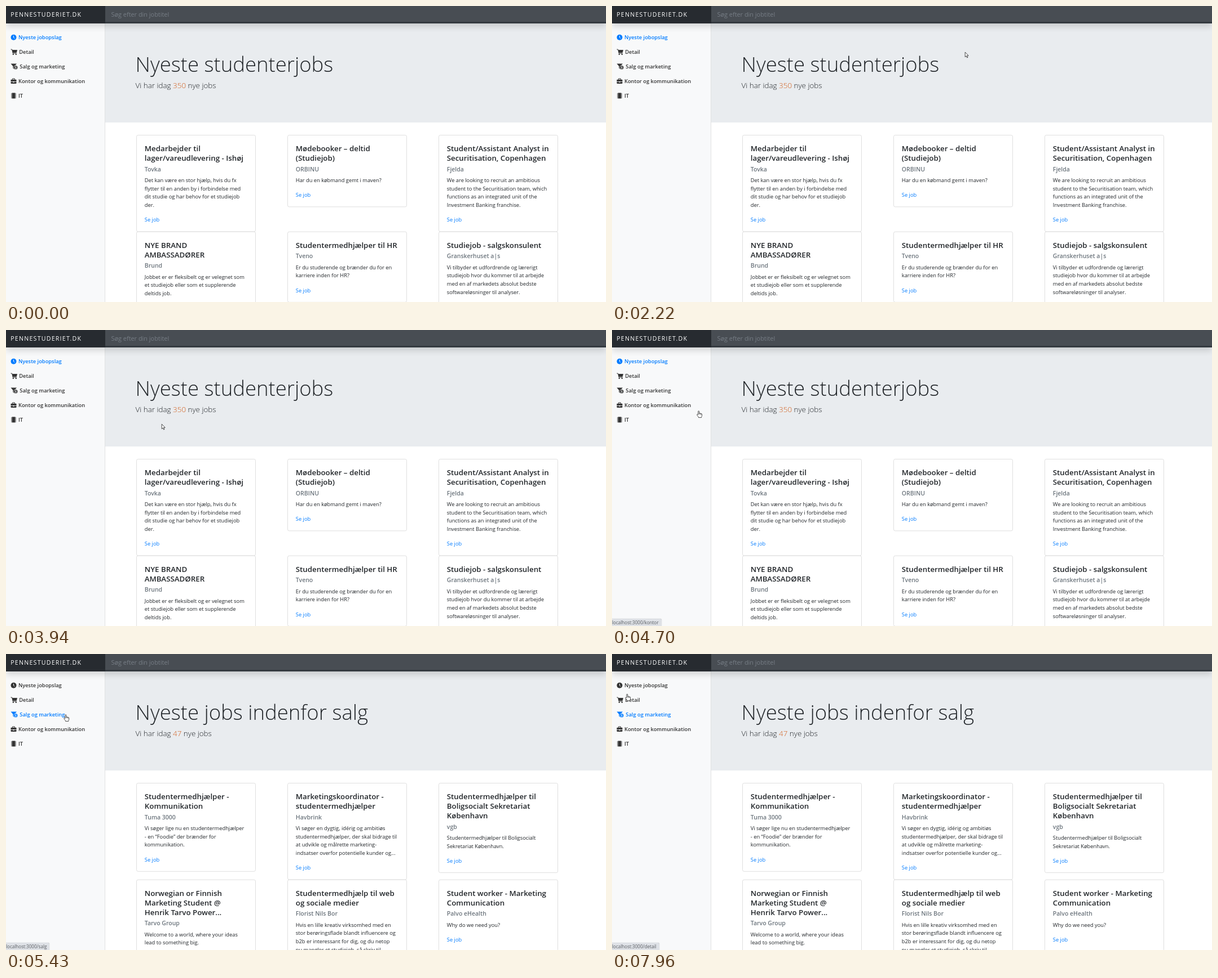
Write an HTML page that moves like this. It is 1064 by 526 pixels and loops after 8 s.

```html
<!DOCTYPE html>
<html lang="da">
<head>
<meta charset="utf-8">
<title>Nyeste studenterjobs</title>
<style>
  html, body { margin: 0; width: 100%; height: 100%; overflow: hidden; background: #fff; }
  body, text { font-family: "Open Sans", "Noto Sans", sans-serif; }
  div, svg { position: absolute; }
  svg { left: 0; top: 0; }
  #side { left: 0; top: 0; width: 175px; height: 526px; background: #f8f9fa; border-right: 1px solid #e0e1e2; }
  #hero { left: 176px; top: 31px; width: 888px; height: 175.5px; background: #e9ecef; }
  #bar { left: 0; top: 0; width: 1064px; height: 30.5px; background: #343a40; box-shadow: 0 5.6px 11.2px rgba(0,0,0,.15); }
  #name { left: 0; top: 0; width: 176px; height: 30.5px; background: #272b30; }
  #search { left: 176px; top: 0; width: 888px; height: 28px; background: #484d53; }
  #status { left: 0; bottom: 0; height: 13px; padding-right: 5px; background: #dee1e6; border-radius: 0 3px 0 0;
    box-shadow: 0 0 1px #999; color: #5a5e63; font-size: 8.1px; line-height: 14px; white-space: nowrap; }
  text { white-space: pre; fill: #212529; }
  .brand { font-size: 10.6px; letter-spacing: 1.25px; fill: #fff; }
  .hint { font-size: 10.9px; fill: #777e86; }
  .head { font-size: 36.5px; font-weight: 300; }
  .lead { font-size: 13.4px; font-weight: 300; }
  .lead tspan { fill: #d2601f; }
  .title { font-size: 13.3px; font-weight: 600; }
  .firm { font-size: 10.5px; font-weight: 600; fill: #6c757d; }
  .body, .link { font-size: 9.3px; }
  .link { fill: #007bff; }
  .card { fill: #fff; stroke: #dfdfdf; }
  .nav { color: #333; }
  .nav.on { color: #007bff; }
  .nav text { font-size: 9.3px; font-weight: 600; fill: currentColor; }
  .nav path { fill: currentColor; }
  .nav .line { fill: none; stroke: currentColor; }
  .nav .cut { fill: none; stroke: #f8f9fa; }
  .pointer { fill: #fff; stroke: #222; stroke-width: .8; stroke-linejoin: round; }
  .beam { fill: none; stroke: #444; stroke-width: .9; }
</style>
</head>
<body>
<div id="side"></div>
<div id="hero"></div>
<div id="bar"><div id="name"></div><div id="search"></div></div>
<svg id="stage" width="1064" height="526"></svg>
<div id="status"></div>
<svg width="1064" height="526"><g id="cursor"></g></svg>
<script>
const $ = id => document.getElementById(id);
const text = (cls, x, y, s) => `<text class="${cls}" x="${x}" y="${y}">${s}</text>`;

const pages = [
  { head: 'Nyeste studenterjobs', count: 350, cards: [
    ['Medarbejder til|lager/vareudlevering - Ishøj', 'Tovka',
      'Det kan være en stor hjælp, hvis du fx|flytter til en anden by i forbindelse med|dit studie og har behov for et studiejob|der.'],
    ['Mødebooker – deltid|(Studiejob)', 'ORBINU', 'Har du en købmand gemt i maven?'],
    ['Student/Assistant Analyst in|Securitisation, Copenhagen', 'Fjelda',
      'We are looking to recruit an ambitious|student to the Securitisation team, which|functions as an integrated unit of the|Investment Banking franchise.'],
    ['NYE BRAND|AMBASSADØRER', 'Brund',
      'Jobbet er er fleksibelt og er velegnet som|et studiejob eller som et supplerende|deltids job.'],
    ['Studentermedhjælper til HR', 'Tveno', 'Er du studerende og brænder du for en|karriere inden for HR?'],
    ['Studiejob - salgskonsulent', 'Granskerhuset a|s',
      'Vi tilbyder et udfordrende og lærerigt|studiejob hvor du kommer til at arbejde|med en af markedets absolut bedste|softwareløsninger til analyser.']
  ] },
  { head: 'Nyeste jobs indenfor salg', count: 47, cards: [
    ['Studentermedhjælper -|Kommunikation', 'Tuma 3000',
      'Vi søger lige nu en studentermedhjælper|- en “Foodie” der brænder for|kommunikation.'],
    ['Marketingskoordinator -|studentermedhjælper', 'Havbrink',
      'Vi søger en dygtig, idérig og ambitiøs|studentermedhjælper, der skal bidrage til|at udvikle og målrette marketing-|indsatser overfor potentielle kunder og...'],
    ['Studentermedhjælper til|Boligsocialt Sekretariat|København', 'vgb',
      'Studentermedhjælper til Boligsocialt|Sekretariat København.'],
    ['Norwegian or Finnish|Marketing Student @|Henrik Tarvo Power...', 'Tarvo Group',
      'Welcome to a world, where your ideas|lead to something big.'],
    ['Studentermedhjælp til web|og sociale medier', 'Florist Nils Bor',
      'Hvis en lille kreativ virksomhed med en|stor berøringsflade blandt influencere og|b2b er interessant for dig, og du netop|nu mangler et studiejob, så skriv til'],
    ['Student worker - Marketing|Communication', 'Palvo eHealth', 'Why do we need you?']
  ] }
];

function card([title, firm, body], i) {
  const x = 231.5 + i % 3 * 268, top = i < 3 ? 229.5 : 401.2, tx = x + 14.3;
  const titles = title.split('|'), lines = body.split('|');
  const firmY = top + 47.2 + 17 * (titles.length - 1);
  const linkY = firmY + 45.4 + 14.7 * (lines.length - 1);
  return `<rect class="card" x="${x}" y="${top}" width="211" height="${linkY + 17.8 - top}" rx="2.8"/>` +
    titles.map((s, n) => text('title', tx, top + 28.6 + 17 * n, s)).join('') +
    text('firm', tx, firmY, firm) +
    lines.map((s, n) => text('body', tx, firmY + 19.3 + 14.7 * n, s)).join('') +
    text('link', tx, linkY, 'Se job');
}

const page = (p, i) => `<g id="page${i}">` + text('head', 229.6, 116.8, p.head) +
  text('lead', 229.6, 145.8, `Vi har idag <tspan>${p.count}</tspan> nye jobs`) + p.cards.map(card).join('') + '</g>';

// Icons are drawn around the vertical centre of their row.
const links = [
  ['Nyeste jobopslag', 22, '',
    '<path d="M8.5 0a5 5 0 1 0 10 0a5 5 0 1 0-10 0"/><path class="cut" d="M13.5-3V.3L15.4 1.8"/>'],
  ['Detail', 23.3, 'detail',
    '<path d="M10.8-3.6H20L18.8 1.2H12Z"/><path class="line" d="M8.5-4.6H10.6L12.3 2.4H18.6"/>' +
    '<path d="M11.6 4a1.2 1.2 0 1 0 2.4 0a1.2 1.2 0 1 0-2.4 0M16.6 4a1.2 1.2 0 1 0 2.4 0a1.2 1.2 0 1 0-2.4 0"/>'],
  ['Salg og marketing', 24.3, 'salg',
    '<path d="M8.5-5H19L15-.5V4.8L12.4 3V-.5Z"/><path stroke="#f8f9fa" stroke-width=".6" d="M13.8 1.6a3.5 3.5 0 1 0 7 0a3.5 3.5 0 1 0-7 0"/>' +
    '<path class="cut" stroke-width=".8" d="M18.4.2H16.7V1.6H18V3H16.2"/>'],
  ['Kontor og kommunikation', 22, 'kontor',
    '<path d="M9.3-2.8H17.7Q18.5-2.8 18.5-2V.6H8.5V-2Q8.5-2.8 9.3-2.8ZM8.5 1.3H12.3V2.3H14.7V1.3H18.5V3.6Q18.5 4.4 17.7 4.4H9.3Q8.5 4.4 8.5 3.6Z"/>' +
    '<path class="line" d="M11.5-2.8V-4.4H15.5V-2.8"/>'],
  ['IT', 22, 'it',
    '<path d="M10.5-5H16.5V5H10.5Z"/><path class="line" stroke-dasharray="1 .9" d="M9.5-4V4.3M17.5-4V4.3"/>']
];

$('stage').innerHTML = text('brand', 8.2, 18.8, 'PENNESTUDERIET.DK') +
  text('hint', 186.5, 19.2, 'Søg efter din jobtitel') +
  links.map(([label, x, , icon], i) =>
    `<g class="nav" transform="translate(0 ${55.8 + 25.9 * i})">${icon}${text('', x, 3.4, label)}</g>`).join('') +
  pages.map(page).join('');
const navs = document.querySelectorAll('.nav');

const shapes = {
  arrow: '<path class="pointer" d="M.4.4V9L2.4 7.2L3.8 10.3L5.2 9.7L3.8 6.6H6.4Z"/>',
  beam: '<path class="beam" d="M-2-4.5H-.6L0-4L.6-4.5H2M0-4V4M-2 4.5H-.6L0 4L.6 4.5H2"/>',
  hand: '<path class="pointer" d="M-1.1 7V1Q-1.1.3-.2.3T.8 1V4.3Q1.7 3.7 2.5 4.6Q3.5 4.2 4.1 5.1Q5.6 4.8 5.6 6.3V8.6Q5.6 10 4.8 10.8V12H-.5V11L-3 7.7Q-3.6 6.6-2.7 6.1Q-2 5.9-1.1 7Z"/>' +
    '<path class="beam" stroke-width=".6" d="M.8 4.3V6.4M2.5 4.8V6.6M4.1 5.2V6.8"/>'
};

// start, end, steps, target x, target y, shape on arrival
const moves = [
  [450, 520, 2, 1052, 518, 'arrow'],
  [750, 1070, 5, 811, 266, 'beam'],
  [1440, 1670, 4, 635, 78, 'arrow'],
  [2220, 2460, 4, 576, 101, 'beam'],
  [2840, 3080, 4, 519, 165, 'arrow'],
  [3450, 3620, 3, 291.5, 166, 'arrow'],
  [3940, 4170, 4, 191, 171, 'arrow'],
  [4320, 5110, 11, 105, 107.5, 'hand'],
  [5190, 5430, 4, 106, 107.5, 'hand'],
  [6990, 7120, 3, 110, 110, 'hand'],
  [7350, 7960, 9, 27, 71, 'hand']
];
const ease = u => u * u * (3 - 2 * u);

function pointer(t) {
  let x = 1016, y = 507, shape = '';
  for (const [start, end, steps, toX, toY, last] of moves) {
    if (t < start) break;
    const step = Math.min(steps, 1 + Math.floor((t - start) / (end - start) * (steps - 1) + .05));
    const u = ease(step / steps);
    x += (toX - x) * u;
    y += (toY - y) * u;
    shape = x < 176 ? 'hand' : step < steps ? 'arrow' : last;
  }
  return { x, y, shape };
}

function draw() {
  const t = performance.now() % 8000, { x, y, shape } = pointer(t);
  const sales = t >= 5430;
  $('page0').style.display = sales ? 'none' : '';
  $('page1').style.display = sales ? '' : 'none';
  navs.forEach((nav, i) => nav.classList.toggle('on', i === (sales ? 2 : 0)));
  $('cursor').innerHTML = shapes[shape] || '';
  $('cursor').setAttribute('transform', `translate(${x} ${y})`);
  const link = shape === 'hand' && links[Math.floor((y - 43) / 25.9)];
  $('status').style.display = link ? '' : 'none';
  if (link) $('status').textContent = 'localhost:3000/' + link[2];
  requestAnimationFrame(draw);
}
draw();
</script>
</body>
</html>
```
